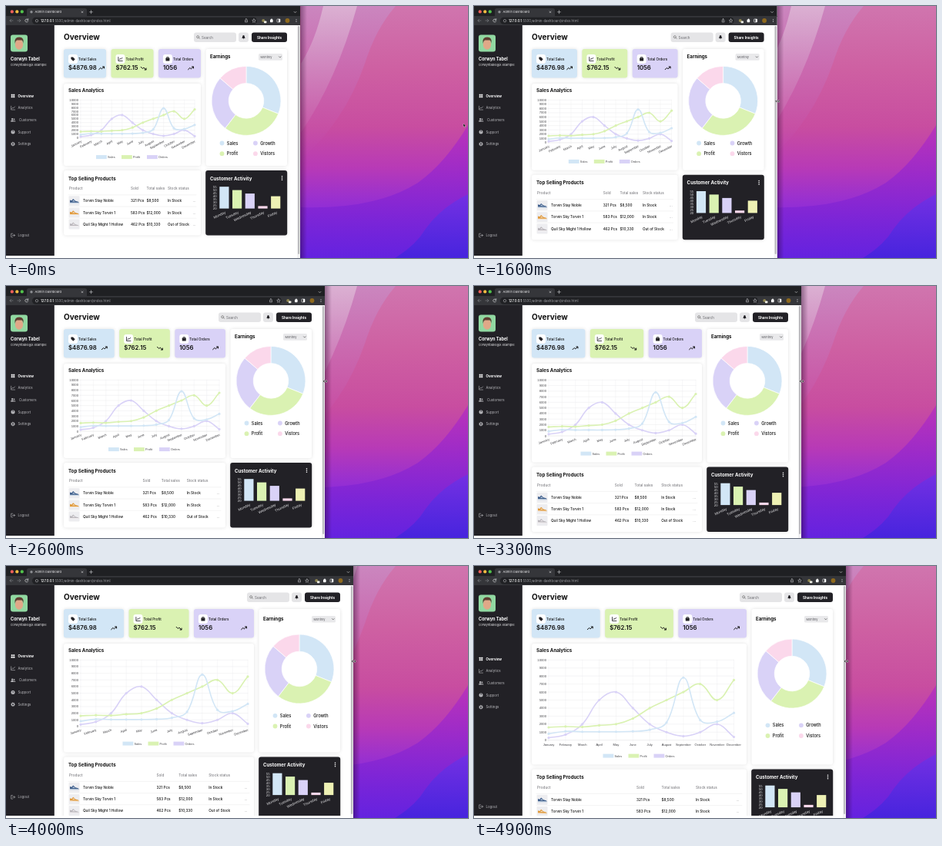
Write an HTML page that moves like this. It is 600 px wide and 328 px high and loops after 5000 ms.

```html
<!DOCTYPE html>
<html lang="en">
<head>
<meta charset="utf-8">
<title>Admin Dashboard</title>
<style>
html, body { margin: 0; width: 100%; height: 100%; overflow: hidden; background: #222126; }
svg { display: block; width: 100vw; height: 100vh; }
text { font-family: Inter, "Open Sans", sans-serif; white-space: pre; }
.chart text { font-family: "Liberation Sans", Arial, sans-serif; }
.card { filter: drop-shadow(0 .8px 2px rgba(0, 0, 0, .12)); }
.line { fill: none; stroke-linecap: round; stroke-linejoin: round; }
</style>
</head>
<body>
<svg viewBox="0 0 600 328" xmlns="http://www.w3.org/2000/svg">
  <defs>
    <linearGradient id="sky" x1="0" y1="0" x2="0" y2="1">
      <stop offset="0" stop-color="#d075ae"/><stop offset=".25" stop-color="#ce60a2"/>
      <stop offset=".48" stop-color="#c84da0"/><stop offset=".64" stop-color="#b83ab6"/>
      <stop offset=".82" stop-color="#8c2cda"/><stop offset="1" stop-color="#5824dc"/>
    </linearGradient>
    <linearGradient id="band" x1="0" y1="0" x2="0" y2="1">
      <stop offset="0" stop-color="#dbb0d2"/><stop offset="1" stop-color="#cb78b8" stop-opacity=".2"/>
    </linearGradient>
    <linearGradient id="mauve" x1="0" y1="0" x2="0" y2="1">
      <stop offset="0" stop-color="#c98cc4" stop-opacity=".75"/><stop offset="1" stop-color="#c055b8" stop-opacity="0"/>
    </linearGradient>
    <linearGradient id="violet" x1="0" y1="0" x2="0" y2="1">
      <stop offset="0" stop-color="#b52cc0" stop-opacity=".75"/><stop offset="1" stop-color="#6422e0"/>
    </linearGradient>
    <linearGradient id="blue" x1="0" y1="0" x2="0" y2="1">
      <stop offset="0" stop-color="#7430e2"/><stop offset="1" stop-color="#4724de"/>
    </linearGradient>
    <linearGradient id="shade">
      <stop offset="0" stop-color="#200020" stop-opacity=".4"/><stop offset="1" stop-color="#200020" stop-opacity="0"/>
    </linearGradient>
    <clipPath id="page"><rect id="pageBox" x="62" y="25" width="320" height="300"/></clipPath>
  </defs>
  <rect width="600" height="328" fill="url(#sky)"/>
  <path d="M383 0H506Q480 30 466 75Q440 150 383 200Z" fill="url(#mauve)"/>
  <path d="M412 0Q402 45 383 75V165Q430 95 456 0Z" fill="url(#band)"/>
  <path d="M600 155Q570 205 535 230Q480 265 383 262V328H600Z" fill="url(#violet)"/>
  <path d="M600 245Q565 262 545 290Q532 312 505 328H600Z" fill="url(#blue)"/>
  <g id="win"></g>
</svg>
<script>
const LOOP = 5000, STEP = 100, FLOOR = 325;
const BLUE = '#d2e6f6', GREEN = '#daf2b2', PURPLE = '#d9d2f7', PINK = '#fbd8eb', LEMON = '#eef1b4';
const DARK = '#222126', INK = '#111', GREY = '#b9b9bd';
const MONTHS = ['January', 'February', 'March', 'April', 'May', 'June', 'July', 'August',
  'September', 'October', 'November', 'December'];
const SERIES = [
  ['Orders', PURPLE, [3, 7, 20, 50, 60, 40, 20, 10, 5, 10, 20, 4]],
  ['Profit', GREEN, [16, 17, 16.5, 18.5, 20, 27, 40, 50, 60, 70, 50, 75]],
  ['Sales', BLUE, [8, 11, 10.5, 10.5, 10.5, 11, 13, 22, 78, 25, 23, 34]]
];
// window width over time
const WIDTHS = [[0, 382], [900, 382], [1600, 393.6], [2600, 414], [3300, 425], [4000, 451], [4900, 483]];
const BREAKPOINT = 427;

const win = document.getElementById('win');
const pageBox = document.getElementById('pageBox');

const rect = (x, y, w, h, fill, r = 0, more = '') =>
  `<rect x="${x}" y="${y}" width="${w}" height="${h}" rx="${r}" fill="${fill}" ${more}/>`;
const dot = (x, y, r, fill) => `<circle cx="${x}" cy="${y}" r="${r}" fill="${fill}"/>`;
const line = (d, color, w = .7, more = '') =>
  `<path class="line" d="${d}" stroke="${color}" stroke-width="${w}" ${more}/>`;
const at = (x, y, s, turn = 0) => `<g transform="translate(${x} ${y}) rotate(${turn})">${s}</g>`;
// y is the middle of the capitals
const text = (x, y, size, s, fill = DARK, weight = 400, more = '') =>
  `<text x="${x}" y="${y + size * .36}" font-size="${size}" font-weight="${weight}" fill="${fill}" ${more}>${s}</text>`;
const card = (x, y, w, h, fill = '#fff') => rect(x, y, w, h, fill, 3, 'class="card"');
const title = (x, y, s, fill = INK) => text(x, y, 6.15, s, fill, 700);
const END = 'text-anchor="end"', MID = 'text-anchor="middle"';

function track(points, t) {
  for (let i = 1; i < points.length; i++) {
    const [a, v] = points[i - 1], [b, u] = points[i];
    if (t <= b) return v + (u - v) * (t - a) / (b - a);
  }
  return points[points.length - 1][1];
}

function chrome(W) {
  const icon = '#d2d3d6';
  return rect(0, 0, W, 14, '#1f2023') + rect(0, 13, W, 12, '#35363a') +
    rect(27, 3, 78, 12, '#35363a', 2.5) +
    dot(7.8, 7.4, 2.1, '#f4605a') + dot(14.3, 7.4, 2.1, '#f6be40') + dot(20.8, 7.4, 2.1, '#52c44c') +
    dot(33, 7.8, 1.7, '#8d8f94') + text(37.5, 7.8, 4.1, 'Admin Dashboard', '#e6e6e8') +
    line('M98 6.8l2 2m0-2l-2 2M108.500 7.800h4m-2-2v4', icon, .6) +
    line(`M${W - 8} 7.3l1.5 1.5l1.5-1.5`, icon, .6) +
    rect(34, 14.8, W - 90, 9, '#202124', 4.5) +
    line('M9 19H5m1.8-1.8L5 19l1.8 1.8', '#85868a', .6) +
    line('M15 19h4m-1.8-1.8L19 19l-1.8 1.8', '#85868a', .6) +
    line('M28.6 18a2 2 0 1 0 .1 1.8M28.8 16.6v1.6h-1.6', icon, .7) +
    `<circle cx="40" cy="19.2" r="1.7" fill="none" stroke="${icon}" stroke-width=".5"/>` +
    text(45, 19.2, 4.4, '127.0.0.1<tspan fill="#9c9da2" font-weight="400">:5500/admin-dashboard/index.html</tspan>', '#fff', 500) +
    line(`M${W - 71.5} 18.5v2.5h3v-2.5M${W - 70} 20v-3.5m-1 1l1-1l1 1`, icon, .5) +
    line(`M${W - 60} 16.8l.7 1.5l1.6.2l-1.2 1.1l.3 1.7l-1.4-.8l-1.4.8l.3-1.7l-1.2-1.1l1.6-.2z`, icon, .5) +
    dot(W - 47.8, 19, 2, '#8e8550') + rect(W - 47, 19.6, 3.4, 2.6, '#f1f1e8', .6) +
    rect(W - 39, 17.6, 3.6, 3.6, '#fff', .6) + dot(W - 37, 17.3, .9, '#fff') +
    rect(W - 30, 17, 4, 4, 'none', .6, 'stroke="#fff" stroke-width=".6"') + rect(W - 28, 17, 2, 4, '#fff') +
    dot(W - 16.5, 19, 2.9, '#8f6a1e') +
    [-1.6, 0, 1.6].map(d => dot(W - 5, 19 + d, .5, icon)).join('');
}

const NAV_ICONS = [
  c => [[-2.3, -2.3], [.3, -2.3], [-2.3, .3], [.3, .3]].map(p => rect(p[0], p[1], 2, 2, c, .4)).join(''),
  c => line('M-2.4-2.4v4.8h5M-1.5 1l1.3-1.5l1 .8l1.7-2', c, .6),
  c => dot(-.8, -1.2, 1.2, c) + dot(1.6, -1, .9, c) + `<path d="M-3 2.2q0-2 2.2-2t2.2 2zM1.8 2.2q0-1.2-.5-1.8q2 0 2 1.8z" fill="${c}"/>`,
  c => dot(0, 0, 2.5, c) + text(0, 0, 3.8, '?', DARK, 700, MID),
  c => `<circle r="1.6" fill="none" stroke="${c}" stroke-width="1.2"/><circle r="2.4" fill="none" stroke="${c}" stroke-width=".8" stroke-dasharray=".95 .93"/>`
];

function sidebar(W) {
  const drop = Math.max(0, (W - 446) * .11), out = 298.5 + Math.max(0, (W - 445) * .385);
  let s = rect(0, 25, 62.8, FLOOR - 25, DARK) + rect(6, 37.5, 22, 22, '#91d8a1', 3) +
    '<ellipse cx="17" cy="50" rx="5.2" ry="6.8" fill="#e0a888"/>' +
    '<path d="M11.600 49q-1.500-8.500 5.500-8.500t5.400 8.500q-.6-4-2-4.500h-6.500q-1.600.8-2.400 4.500z" fill="#5f3f32"/>' +
    text(6, 68.7, 5.6, 'Corwyn Tabel', '#fff', 700) +
    text(6, 76.3, 4, 'corwyntabel@x.example', '#e2e2e4');
  ['Overview', 'Analytics', 'Customers', 'Support', 'Settings'].forEach((name, i) => {
    const y = 117 + i * 15.65 + drop, c = i ? GREY : '#fff';
    s += at(9, y, NAV_ICONS[i](c)) + text(i == 2 ? 17 : 15.5, y, 4.4, name, c, i ? 400 : 700);
  });
  return s + at(9, out, line('M-.5-2.3h-1.8v4.6h1.8M-.6 0h3.2m-1.4-1.4l1.4 1.4l-1.4 1.4', GREY, .6)) +
    text(15.5, out, 4.4, 'Logout', GREY);
}

function header(W) {
  return text(75, 40.8, 10, 'Overview', INK, 700) +
    rect(W - 138, 34.5, 55, 12.5, '#e5e5e7', 3) +
    line(`M${W - 130.4} 42.4l-1.2-1.2a1.5 1.5 0 1 0-.3.3`, '#444', .6) +
    text(W - 128, 41, 4.5, 'Search', '#66666b') +
    rect(W - 80, 34.5, 13, 12.5, '#e5e5e7', 3) +
    at(W - 73.5, 40.6, `<path d="M-2.2 1.5q.8-.8.8-2.3q.2-1.7 1.4-1.7t1.4 1.7q0 1.5.8 2.3zM-.8 2h1.6q-.8 1.1-1.6 0z" fill="${DARK}"/>`) +
    rect(W - 63, 34.5, 46, 12.5, DARK, 3) +
    text(W - 40, 41, 4.6, 'Share Insights', '#fff', 700, MID);
}

const STATS = [
  ['Total Sales', '$4876.98', BLUE, 1, 43,
    `<path d="M-2.6-2.4h2.6l2.7 2.6l-2.4 2.5l-2.9-2.7z" fill="${DARK}"/>`],
  ['Total Profit', '$762.15', GREEN, -1, 36, line('M-2.6-2.5v5h5.4M-1.6 1l1.4-1.6l1.1.8l1.6-1.9', DARK, .8)],
  ['Total Orders', '1056', PURPLE, 1, 20,
    rect(-2.5, -1.4, 5, 4, DARK, .6) + line('M-1.2-1.4v-1.1h2.4v1.1', DARK, .7)]
];

function stats(W) {
  const w = (W - 204 - 12.8) / 3;
  return STATS.map(([label, value, fill, dir, end, icon], i) => {
    const x = 75 + i * (w + 6.4), ax = Math.max(x + w - 13, x + end + 6);
    return card(x, 56, w, 37.5, fill) + rect(x + 6, 63, 12, 12, '#fff', 3) + at(x + 12, 69, icon) +
      text(x + 19, 69.3, 4.5, label, INK, 500) + text(x + 6, 80.6, 7.8, value, INK, 600) +
      `<g transform="translate(${ax} 81) scale(1 ${dir})">` +
      line('M-3.4 1.7l2.2-2.2l1.6 1.3l2.9-2.6M1.5-2h2v2', INK, 1) + '</g>';
  }).join('');
}

// cubic through the points, tension .4, kept inside the plot
function spline(p, top, low) {
  const clamp = v => Math.min(low, Math.max(top, v));
  const ctl = p.map((c, i) => {
    const a = p[i - 1] || c, b = p[i + 1] || c;
    const d0 = Math.hypot(c[0] - a[0], c[1] - a[1]), d1 = Math.hypot(b[0] - c[0], b[1] - c[1]);
    const k = .4 / (d0 + d1), dx = b[0] - a[0], dy = b[1] - a[1];
    return [c[0] - k * d0 * dx, clamp(c[1] - k * d0 * dy), c[0] + k * d1 * dx, clamp(c[1] + k * d1 * dy)];
  });
  return 'M' + p[0] + p.slice(1).map((c, i) =>
    `C${ctl[i][2]},${ctl[i][3]} ${ctl[i + 1][0]},${ctl[i + 1][1]} ${c}`).join('');
}

function analytics(W, B) {
  const x0 = 97, top = 122.3, flat = W > 466, x1 = W - (flat ? 145.5 : 137), dx = (x1 - x0) / 11;
  const sin = flat ? 0 : 6.3 / dx, angle = -Math.asin(sin) * 180 / Math.PI;
  const low = B - (flat ? 31.8 : 27.2 + sin * 20);
  let s = card(75, 101, W - 204, B - 101) + title(81, 109.3, 'Sales Analytics') + '<g class="chart">';
  for (let i = 0; i <= 10; i++) {
    const y = low - (low - top) * i / 10;
    s += line(`M${x0 - 2} ${y}H${x1}`, i ? '#e6e6e8' : '#d4d4d6', .4) +
      text(x0 - 3, y, 4.2, i * 1000, '#48484c', 400, END);
  }
  MONTHS.forEach((m, i) => {
    const x = x0 + i * dx;
    s += line(`M${x} ${top}V${low + 2}`, '#eaeaec', .4) + (flat
      ? text(x, low + 5.8, 4.1, m, '#3c3c40', 400, MID)
      : at(x + .6, low + 4.2, text(0, 0, 4.2, m, '#3c3c40', 400, END), angle));
  });
  for (const [, color, data] of SERIES) {
    const pts = data.map((v, i) => [x0 + i * dx, low - (low - top) * v / 100]);
    s += line(spline(pts, top, low), color, 1.6) + pts.map(p => dot(p[0], p[1], 1.6, color)).join('');
  }
  const mid = (W - 54) / 2;
  [...SERIES].reverse().forEach(([name, color], i) => {
    const x = mid - 47 + i * 33, y = B - 11.4;
    s += rect(x, y - 2.5, 13.8, 5, color) + text(x + 15, y, 3.9, name, '#48484c');
  });
  return s + '</g>';
}

function donut(cx, cy) {
  const stops = [0, 112, 217.5, 311, 360], R = 45, r = 22.8;
  const pt = (deg, q) => {
    const a = deg * Math.PI / 180;
    return `${cx + q * Math.sin(a)} ${cy - q * Math.cos(a)}`;
  };
  return [BLUE, GREEN, PURPLE, PINK].map((c, i) => {
    const a = stops[i], b = stops[i + 1];
    return `<path d="M${pt(a, R)}A${R} ${R} 0 0 1 ${pt(b, R)}L${pt(b, r)}A${r} ${r} 0 0 0 ${pt(a, r)}Z" fill="${c}" stroke="#fff" stroke-width=".7"/>`;
  }).join('');
}

function earnings(W, B) {
  const wide = W > BREAKPOINT, over = W - 451;
  const ty = wide ? 69 : 66.2, cy = wide ? 134 + over * .19 : 123.4, ly = wide ? 194.8 + over * .39 : 178.5;
  let s = card(W - 122.5, 56, 105.5, B - 56) + title(W - 117, ty, 'Earnings') +
    rect(W - 54, ty - 4.1, 31, 8.6, '#e9e9eb', 1.5) + text(W - 51.5, ty + .3, 3.9, 'Monthly', '#55555a') +
    line(`M${W - 27.5} ${ty - .4}l1.3 1.3l1.3-1.3`, '#333', .6) + donut(W - 70, cy);
  [['Sales', BLUE], ['Growth', PURPLE], ['Profit', GREEN], ['Vistors', PINK]].forEach(([name, c], i) => {
    const x = W - 101.5 + i % 2 * 43.4, y = ly + (i >> 1) * 13.7;
    s += dot(x, y, 2.9, c) + text(x + 6.3, y, 5.6, name, INK, 500);
  });
  return s;
}

const ROWS = [
  ['Torvin Stay Noble', '321 Pcs', '$8,500', 'In Stock', '#3f5f8c', '#c9d6e4'],
  ['Torvin Sky Torvin 1', '583 Pcs', '$12,000', 'In Stock', '#e09a3c', '#f3e3cf'],
  ['Quil Sky Might 1 Hollow', '462 Pcs', '$10,330', 'Out of Stock', '#b9b6bb', '#f0ecee']
];

function products(W, y) {
  const d = W - 382, cols = [82, 162 + d * .485, 182.5 + d * .605, 210 + d * .772];
  let s = card(75, y, W - 204, 84.5) + title(81, y + 10.3, 'Top Selling Products');
  ['Product', 'Sold', 'Total sales', 'Stock status'].forEach((h, i) => {
    s += text(cols[i], y + 23.6, 4.7, h, '#808085', 500);
  });
  ROWS.forEach(([name, sold, total, stock, main, pale], i) => {
    const ry = y + 39.7 + i * 15.2;
    s += line(`M81 ${ry - 7.8}H${W - 135}`, '#e2e2e4', .4) + rect(81.5, ry - 6.5, 14, 13, '#ededf0', 1) +
      at(88.5, ry, `<path d="M-5.5 2.2v-3.4l2.2.8l2-2.2l3 2.7l3.6 1q1 .6.6 1.8z" fill="${main}"/>` +
        `<path d="M-5.5 2h11.5v1.2h-11.5zM-2.5.6l1.6-1.6l2.3 1.7z" fill="${pale}"/>`) +
      [name, sold, total, stock].map((v, k) => text(k ? cols[k] : 100, ry, 4.7, v, INK, 500)).join('') +
      text(242.5 + d * .97, ry, 4.6, '...', '#66666a');
  });
  return s;
}

function activity(W, y) {
  const base = y + 49.6;
  let s = card(W - 122.8, y, 106, 84.5, DARK) + title(W - 117, y + 10.3, 'Customer Activity', '#fff') +
    [-2.3, 0, 2.3].map(k => dot(W - 23.5, y + 10 + k, .8, '#fff')).join('') + '<g class="chart">';
  for (let i = 0; i < 8; i++) s += text(W - 108.5, base - i * 4, 4.2, 20 + i * 5, '#e4e4e6', 400, END);
  [['Monday', 28.4, BLUE], ['Tuesday', 24, GREEN], ['Wednesday', 19.5, PURPLE], ['Thursday', 3.2, PINK],
    ['Friday', 16, LEMON]].forEach(([day, h, c], i) => {
    const bx = W - 104.7 + i * 16.7;
    s += rect(bx, base - h, 12.2, h, c) +
      at(bx + 7.5, base + 4.5, text(0, 0, 4.7, day, '#e4e4e6', 400, END), -26);
  });
  return s + '</g>';
}

function cursor(t, W) {
  const k = Math.min(1, t / 700), e = k * k * (3 - 2 * k);
  if (k < 1) return at(594 + (W - 594) * e, 153 - 31 * e,
    '<path d="M0 0v4.3l1-.9l.8 1.7l.8-.4l-.8-1.6h1.4z" fill="#111" stroke="#fff" stroke-width=".3"/>');
  const arrows = 'M-2.2 0h4.4M-1.2-1.2l-1.2 1.2l1.2 1.2M1.2-1.2l1.2 1.2l-1.2 1.2';
  return at(W + .5, t < 1000 ? 122 : 124, line(arrows, '#fff', 1.2) + line(arrows, '#111', .7));
}

function draw(t) {
  const W = track(WIDTHS, t), B = 208 + (W - 382) / 2;
  pageBox.setAttribute('width', W - 62);
  win.innerHTML = rect(W, 0, 9, 328, 'url(#shade)') + rect(0, 0, W, 328, '#fff') +
    '<g clip-path="url(#page)">' + header(W) + stats(W) + analytics(W, B) + earnings(W, B) +
    products(W, B + 6) + activity(W, B + 6) + '</g>' +
    rect(W - 4, 25, 4, 303, '#f3f3f4') + rect(W - 3, 26, 2.2, 297, '#bcbcbf', 1.1) +
    sidebar(W) + chrome(W) + cursor(t, W);
}

let start = null, last = -1;
function tick(now) {
  if (start === null) start = now;
  const n = Math.floor((now - start) % LOOP / STEP);
  if (n !== last) draw((last = n) * STEP);
  requestAnimationFrame(tick);
}
draw(0);
requestAnimationFrame(tick);
</script>
</body>
</html>
```
